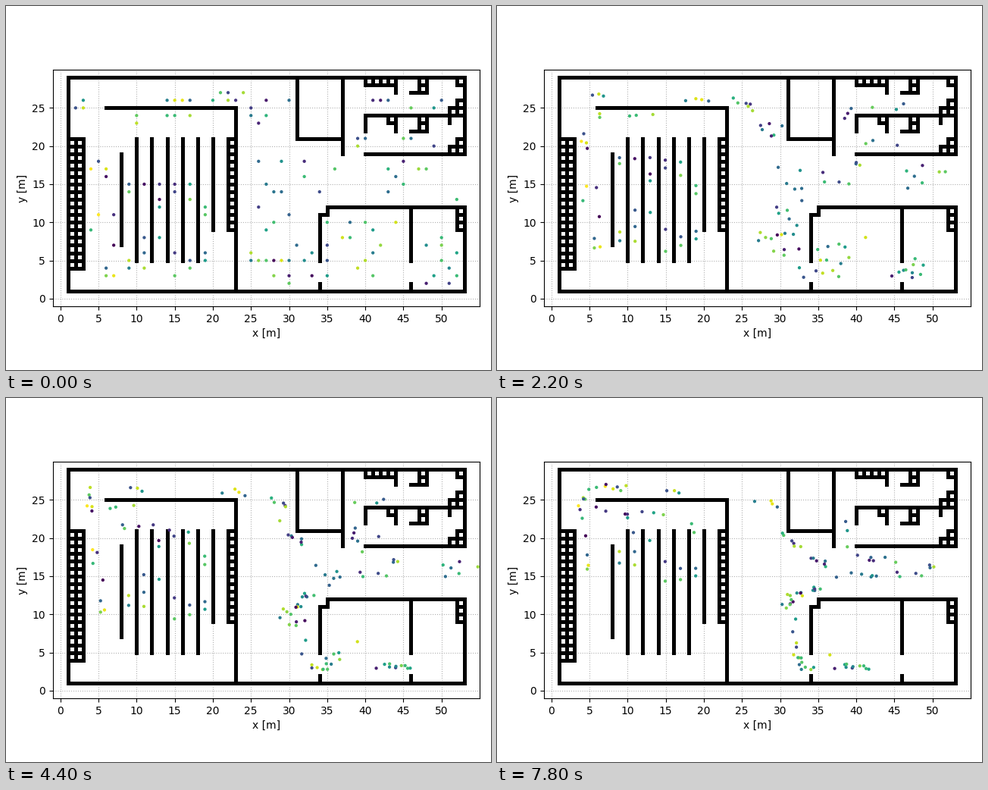
These frames come from a looping animation (640 px wide and 480 px high, 8000 ms). A matplotlib script:

```python
import numpy as np
import matplotlib.pyplot as plt
from matplotlib.animation import FuncAnimation

FRAMES, STEP_MS = 40, 200
rng = np.random.default_rng(11)

fig = plt.figure(figsize=(6.4, 4.8), dpi=100)
width = 563.3
height = width * 31 / 56
ax = fig.add_axes([(625 - width) / 640, 0.5 - height / 960,
                   width / 640, height / 480])
ax.set(xlim=(-1, 55), ylim=(-1, 30), xlabel="x [m]", ylabel="y [m]")
ax.set_xticks(range(0, 51, 5))
ax.set_yticks(range(0, 26, 5))
ax.grid(linestyle=":")


# ---- floor plan ----
def wall(*pts):
    ax.plot(*zip(*pts), color="black", lw=3.6,
            solid_capstyle="projecting", solid_joinstyle="miter")


def shelf(x0, x1, y0, y1):
    for x in range(x0, x1 + 1):
        wall((x, y0), (x, y1))
    for y in range(y0, y1 + 1):
        wall((x0, y), (x1, y))


wall((53, 19), (53, 29), (1, 29), (1, 1), (53, 1), (53, 12),
     (35, 12), (35, 11), (34, 11), (34, 5))
for x in (34, 46):
    wall((x, 1), (x, 2))
wall((46, 5), (46, 12))
wall((23, 1), (23, 25), (6, 25))
wall((31, 29), (31, 21), (37, 21))
wall((37, 29), (37, 19))
wall((40, 19), (53, 19))
wall((53, 24), (40, 24), (40, 22))

wall((8, 7), (8, 19))
for x in range(10, 19, 2):
    wall((x, 5), (x, 21))
wall((20, 9), (20, 21))

shelf(1, 3, 4, 21)
shelf(22, 23, 9, 21)
shelf(52, 53, 9, 12)
shelf(40, 44, 28, 29)
shelf(52, 53, 28, 29)
shelf(43, 44, 23, 24)
wall((51, 23), (51, 24))
for y in (29, 24):
    wall((44, y), (44, y - 2))
    wall((46, y - 2), (47, y - 2))
    shelf(47, 48, y - 2, y)
for y in (24, 19):
    wall((51, y), (51, y + 1), (52, y + 1))
    shelf(52, 53, y, y + 2)


# ---- routes, each one joining the next towards the exit on the right ----
OUT = [(60, 15.8)]
HALL = [(38, 15.2), (48, 15.2)] + OUT
LOBBY = [(30.2, 20.5), (33, 18.3)] + HALL
TOP = [(23, 26.2), (29.6, 24.4)] + LOBBY
CORNER = [(3.9, 26.3), (6.5, 26.9), (13, 26.2)] + TOP
LEFT = [(4.3, 20), (3.7, 25)] + CORNER
BACK = [(5.8, 24.1), (3.9, 25.3)] + CORNER
CROWD = [(31.3, 12.3), (34, 13.2)] + HALL
DOOR = [(34.5, 3.1), (33, 3), (32, 5), (32, 9)] + CROWD
GAP = [(46, 3.2)] + DOOR
NORTH = [(38.8, 18.8), (40.2, 17.6), (48.8, 16.5)] + OUT
UPPER = [(39, 24.8), (38.5, 22)] + NORTH
LOWER = [(39.3, 20.2)] + NORTH

walkers = []


def add(start, route, speed=0.345, drag=0.0, exact=0):
    """Store one walker; the first `exact` waypoints get no sideways shift."""
    path = np.array([start] + route, float)
    path[1 + exact:] += rng.uniform(-0.4, 0.4, 2)
    dist = np.r_[0, np.cumsum(np.hypot(*np.diff(path, axis=0).T))]
    walkers.append((path, dist, speed * rng.uniform(0.95, 1.05), drag))


def scatter_people(n, xs, ys, route, **pace):
    """Put n walkers on random whole metres of a rectangle."""
    cells = [(x, y) for x in range(xs[0], xs[1] + 1)
             for y in range(ys[0], ys[1] + 1)]
    for cell in rng.permutation(cells)[:n]:
        add(tuple(cell), route, **pace)


# hall with the long shelves
scatter_people(3, (2, 4), (23, 28), CORNER)
scatter_people(5, (8, 21), (23, 24), BACK)
scatter_people(9, (9, 23), (26, 27), TOP)
scatter_people(11, (4, 7), (3, 18), LEFT)
for lane in range(9, 20, 2):
    turn = [(lane - 0.1, 20.5), (lane - 1, 22), (max(lane - 4, 6), 23.4)]
    for y in rng.permutation(np.arange(3, 16))[:4]:
        add((lane, y), turn + BACK, speed=0.33 - 0.007 * (lane - 9), exact=1)

# middle hall
scatter_people(7, (24, 30), (22, 28), LOBBY, speed=0.31)
scatter_people(9, (26, 36), (14, 18), HALL)
scatter_people(18, (24, 33), (2, 12), CROWD, speed=0.36, drag=0.0035)

# rooms on the right, and the corridor between them
scatter_people(15, (35, 45), (3, 10), DOOR, drag=0.0027)
scatter_people(10, (47, 52), (2, 11), GAP, drag=0.0015)
scatter_people(6, (38, 50), (25, 26), UPPER)
scatter_people(6, (39, 49), (20, 21), LOWER)
scatter_people(8, (41, 52), (13, 18), OUT)

hues = rng.random(len(walkers))


def positions(i):
    spots = []
    for path, dist, speed, drag in walkers:
        d = speed * i - drag * i * i
        spots.append([np.interp(d, dist, axis) for axis in path.T])
    return np.array(spots)


dots = ax.scatter(*positions(0).T, c=hues, s=9.5, cmap="viridis",
                  vmin=0, vmax=1, linewidths=0, zorder=3)


def update(i):
    dots.set_offsets(positions(i))
    return (dots,)


anim = FuncAnimation(fig, update, frames=FRAMES, interval=STEP_MS,
                     repeat=True, repeat_delay=0)
plt.show()
```
